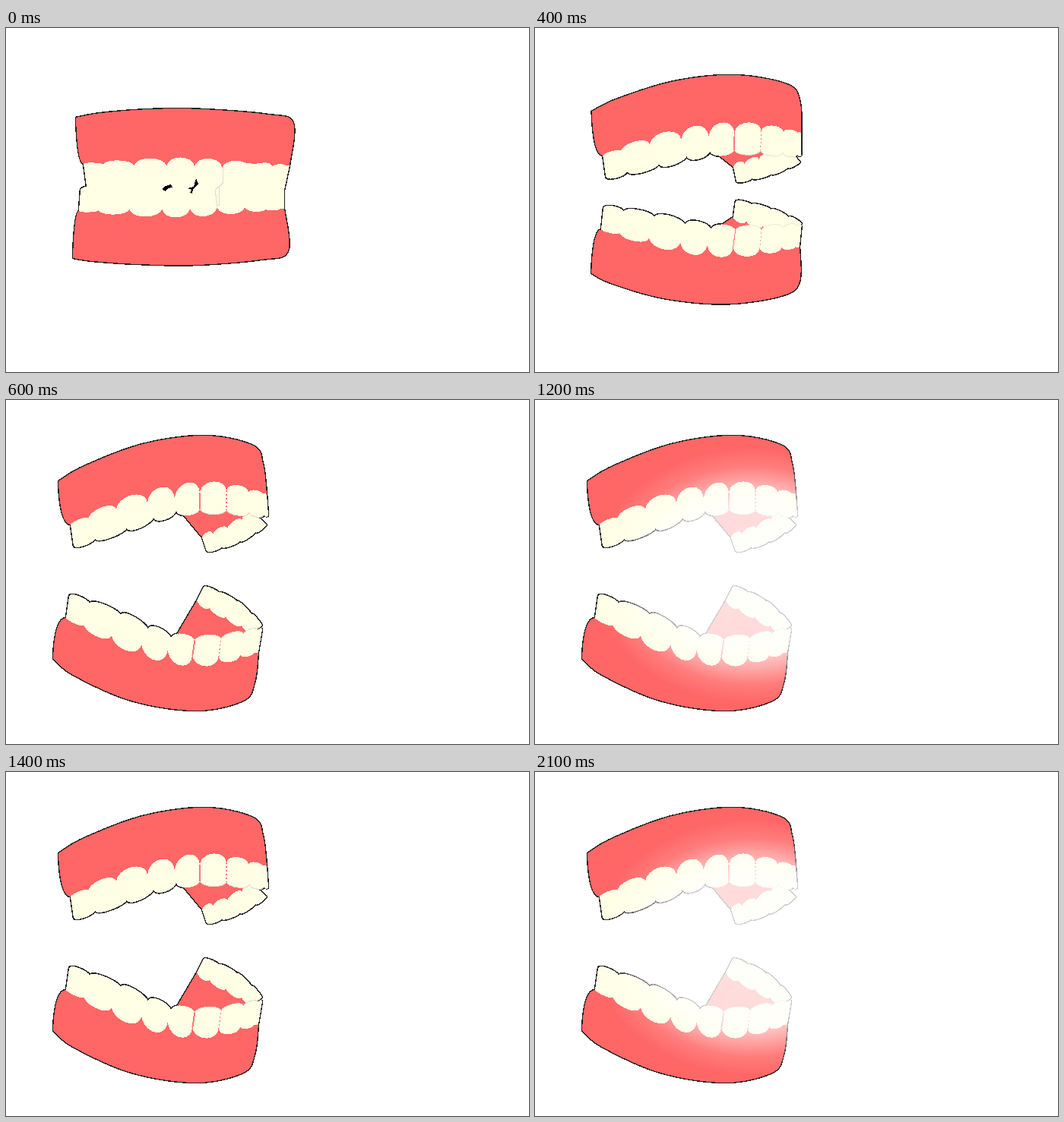
Animation of 688 by 453 pixels, one loop 2300 ms. Source, as an HTML page:

```html
<!DOCTYPE html>
<html lang="en">
<head>
<meta charset="utf-8">
<title>Denture</title>
<style>
html, body { margin: 0; width: 100%; height: 100%; overflow: hidden; background: #fff; }
svg { display: block; width: 688px; height: 453px; }
path { shape-rendering: crispEdges; }
.tooth { fill: #ffffe5; }
.gum { fill: #f66; }
.rim { fill: #222; stroke: #222; stroke-width: 2.8; stroke-linejoin: round; }
.faint { fill: none; stroke: #deded0; stroke-width: 1.1; }
.seam { fill: none; stroke: #f77; }
</style>
</head>
<body>
<svg viewBox="0 0 688 453">
  <defs>
    <radialGradient id="soft">
      <stop offset="0" stop-color="#fff" stop-opacity=".5"/>
      <stop offset=".5" stop-color="#fff" stop-opacity=".43"/>
      <stop offset=".75" stop-color="#fff" stop-opacity=".18"/>
      <stop offset="1" stop-color="#fff" stop-opacity="0"/>
    </radialGradient>
    <radialGradient id="strong">
      <stop offset="0" stop-color="#fff" stop-opacity=".8"/>
      <stop offset=".58" stop-color="#fff" stop-opacity=".76"/>
      <stop offset=".72" stop-color="#fff" stop-opacity=".45"/>
      <stop offset=".85" stop-color="#fff" stop-opacity=".15"/>
      <stop offset="1" stop-color="#fff" stop-opacity="0"/>
    </radialGradient>
  </defs>
  <g id="mouth"></g>
  <ellipse class="glow" cx="315" cy="236" rx="170" ry="117" fill="url(#soft)"/>
  <ellipse class="glow" cx="285" cy="231" rx="210" ry="169" fill="url(#strong)"/>
</svg>
<script>
// Key points of each curve, shut and wide open; every pose lies between the two.
const upper = {
  side: -1,
  base: ["92 118 125 112 190 107 258 107 345 114 378 125", "69 107 103 87 180 58 262 47 325 60 338 84"],
  neck: ["102 179 172 181 240 182 309 184 373 181", "85 164 148 143 214 130 278 119 343 124"],
  tip: ["106 209 180 211 241 211 305 211 366 213", "89 192 162 168 217 148 278 144 345 152"],
  backNeck: ["270 190 305 184 350 182", "258 181 291 169 325 148"],
  backTip: ["268 212 318 212 366 213", "264 199 308 186 343 164"]
};
const lower = {
  side: 1,
  base: ["88 303 115 307 175 311 250 312 335 305 371 294", "62 341 90 363 165 396 250 409 312 396 327 372"],
  neck: ["96 241 166 239 234 238 302 236 366 238", "79 287 142 311 205 328 268 339 332 332"],
  tip: ["98 213 168 210 240 210 303 210 366 214", "83 258 154 284 210 311 271 316 337 302"],
  backNeck: ["272 232 312 234 355 235", "251 264 289 285 326 305"],
  backTip: ["268 208 318 209 366 213", "260 246 304 265 337 297"]
};

const FRONT = [0, .11, .238, .394, .53, .66, .793, .891, .967, 1];
const BACK = [0, .25, .5, .75, 1];
const lerp = (a, b, t) => a + (b - a) * t;

function blend([shut, wide], open) {
  const a = shut.split(" "), b = wide.split(" "), pts = [];
  for (let i = 0; i < a.length; i += 2) {
    pts.push([lerp(+a[i], +b[i], open), lerp(+a[i + 1], +b[i + 1], open)]);
  }
  return pts;
}

// Point at u (0 to 1) on a smooth curve through the given points.
function at(pts, u) {
  const last = pts.length - 1;
  const i = Math.min(Math.floor(u * last), last - 1), t = u * last - i;
  const p1 = pts[i], p2 = pts[i + 1], p0 = pts[i - 1] || p1, p3 = pts[i + 2] || p2;
  return p1.map((v, k) => v + t / 2 * (p2[k] - p0[k] +
    t * (2 * p0[k] - 5 * v + 4 * p2[k] - p3[k] + t * (3 * (v - p2[k]) + p3[k] - p0[k]))));
}

function sample(pts, from = 0, to = 1, n = 40) {
  return Array.from({ length: n + 1 }, (_, i) => at(pts, lerp(from, to, i / n)));
}

const middle = (a, b) => a.map((p, i) => [(p[0] + b[i][0]) / 2, (p[1] + b[i][1]) / 2]);
const poly = pts => "M" + pts.join("L") + "Z";
const path = (cls, d, extra = "") => `<path class="${cls}" d="${d}" ${extra}/>`;

// Arc from a to b that rises by h at its middle.
function arc(a, b, h, inset) {
  const x = lerp(a[0], b[0], inset), x2 = lerp(b[0], a[0], inset), rise = h / .75;
  return `C${x},${a[1] + rise} ${x2},${b[1] + rise} ${b}`;
}

function teeth(cuts, neck, tip, side, neckBulge, tipBulge) {
  return cuts.slice(1).map((end, i) => {
    const start = cuts[i], swell = Math.sin(Math.PI * (start + end) / 2);
    const size = Math.min(1, (end - start) * 12);
    const a = at(neck, start), b = at(neck, end), c = at(tip, end), d = at(tip, start);
    const edge = arc(c, d, -side * size * tipBulge(swell), .1);
    return {
      shape: `M${a}${arc(a, b, side * neckBulge(swell), .08)}L${c}${edge}Z`,
      edge: `M${c}${edge}`
    };
  });
}

function drawJaw(jaw, open) {
  const [base, neck, tip, backNeck, backTip] =
    ["base", "neck", "tip", "backNeck", "backTip"].map(k => blend(jaw[k], open));
  const front = teeth(FRONT, neck, tip, jaw.side, s => lerp(11.5, 17, open) * s, s => 4 + 3 * s);
  const back = teeth(BACK, backNeck, backTip, -jaw.side, () => -5, () => -2.5);

  const ridge = sample([...base, neck[neck.length - 1]]);
  const gum = "M" + [...ridge, ...sample(neck, 1, 0)].join("L") +
    `Q${base[0][0] + 2},${neck[0][1]} ${base[0]}Z`;
  const inside = middle(sample(neck, .6), sample(tip, .6));
  const palate = poly([at(tip, .55), ...inside, ...sample(backNeck, 1, 0)]);

  const reds = [gum, palate];
  const whites = [...back, ...front].map(t => t.shape);
  const seam = (k, width, dash) => path("seam", `M${at(neck, FRONT[k])}L${at(tip, FRONT[k])}`,
    `stroke-width="${width * open}" stroke-dasharray="${dash}"`);
  return {
    rim: [...reds, ...whites].map(d => path("rim", d)).join(""),
    fill: reds.map(d => path("gum", d)).join("") + whites.map(d => path("tooth", d)).join("") +
      front.slice(5).map(t => path("faint", t.edge, `stroke-opacity="${open}"`)).join("") +
      seam(5, 2, "none") + seam(6, 1.3, "2 3")
  };
}

// Crevices and a hairline that show only while the jaws touch.
const biteMarks =
  path("faint", "M286 183L285 205 275 213 278 236M281 208L280 234") +
  path("pit", "M205 212L210 208 217 206 219 210 213 211 210 215Z") +
  path("pit", "M250 198L253 205 246 213 245 218 242 217 244 213 239 211 247 209Z");

function drawMouth(top, bottom) {
  const jaws = [drawJaw(upper, top), drawJaw(lower, bottom)];
  return jaws.map(j => j.rim).join("") + jaws.map(j => j.fill).join("") + (top ? "" : biteMarks);
}

const steps = [
  { from: 0, top: 0, bottom: 0, glow: 0 },
  { from: 200, top: .32, bottom: .22, glow: 0 },
  { from: 400, top: .75, bottom: .53, glow: 0 },
  { from: 600, top: 1, bottom: 1, glow: 0 },
  { from: 1000, top: 1, bottom: 1, glow: 1 },
  { from: 1200, top: 1, bottom: 1, glow: 2 },
  { from: 1400, top: 1, bottom: 1, glow: 0 },
  { from: 1900, top: 1, bottom: 1, glow: 1 },
  { from: 2100, top: 1, bottom: 1, glow: 2 }
];
const LOOP = 2300;
const mouth = document.getElementById("mouth");
const glows = document.querySelectorAll(".glow");
let shown;

function render(time) {
  const t = time % LOOP;
  const step = steps.filter(s => s.from <= t).pop();
  if (step === shown) return;
  shown = step;
  mouth.innerHTML = drawMouth(step.top, step.bottom);
  glows.forEach((g, i) => { g.style.display = i + 1 === step.glow ? "" : "none"; });
}

const start = performance.now();
function tick() {
  render(performance.now() - start);
  requestAnimationFrame(tick);
}
tick();
</script>
</body>
</html>
```
